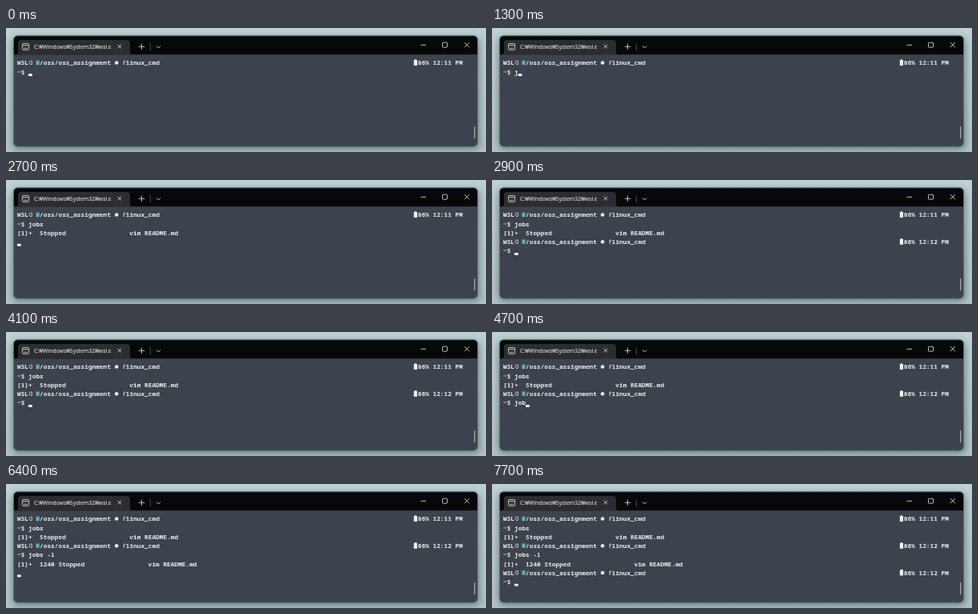
An HTML page that plays this animation: 600x155 px, repeating every 7.9 s.

```html
<!DOCTYPE html>
<html lang="en">
<head>
<meta charset="utf-8">
<title>Terminal: jobs</title>
<style>
html, body { margin: 0; width: 100%; height: 100%; overflow: hidden; background: #b9cacd; }
svg { display: block; width: 100%; height: 100%; }
text { white-space: pre; }
.mono { font: 600 7.8px "Noto Sans Mono", monospace; fill: #e9ecee; }
.title { font: 500 6.9px "Noto Sans", sans-serif; fill: #f4f4f4; }
.line { fill: none; stroke: #e6e6e6; stroke-width: .8; }
</style>
</head>
<body>
<svg viewBox="0 0 600 155" preserveAspectRatio="none">
  <defs>
    <linearGradient id="desk" x2="0" y2="1">
      <stop offset="0" stop-color="#c0d1d4"/>
      <stop offset="1" stop-color="#b3c5c8"/>
    </linearGradient>
    <filter id="soft" x="-10%" y="-20%" width="120%" height="140%"><feGaussianBlur stdDeviation="5"/></filter>
    <clipPath id="win"><rect x="9.5" y="9.8" width="580" height="138.4" rx="5"/></clipPath>
    <clipPath id="label"><rect x="34" y="15" width="97" height="18"/></clipPath>
    <g id="prompt">
      <text class="mono" x="14" y="0">WSL</text>
      <path class="line" d="M32.4 -5.2V-1H30.4L28.8 -3L30.4 -5.2Z"/>
      <rect x="37.4" y="-5.7" width="4.4" height="5.4" fill="#62a9b5"/>
      <text class="mono" x="42.08" y="0">/oss/oss_assignment</text>
      <circle cx="138.2" cy="-2.9" r="2.3" fill="#e9ecee"/>
      <path d="M145.6 -7.4V1" stroke="#15181c" stroke-width=".9"/>
      <path class="line" d="M146.8 .3V-6M146.8 -2.2Q149 -2.6 149 -5.4"/>
      <text class="mono" x="149.72" y="0">linux_cmd</text>
      <path d="M509.8 -6.4H511V-7.2H512.8V-6.4H514V.6H509.8Z" fill="#f1f3f4"/>
    </g>
  </defs>

  <rect width="600" height="155" fill="url(#desk)"/>
  <rect x="8" y="12" width="584" height="140" rx="6" fill="#25383b" opacity=".5" filter="url(#soft)"/>

  <g clip-path="url(#win)">
    <rect x="9" y="9" width="582" height="140" fill="#3d434c"/>
    <rect x="9" y="9" width="582" height="24.2" fill="#07080a"/>
    <path d="M12 33.2Q15 33.2 15 30V19Q15 15 19 15H151Q155 15 155 19V30Q155 33.2 158 33.2Z" fill="#2b2d31"/>
  </g>
  <rect x="9.5" y="9.8" width="580" height="138.4" rx="5" fill="none" stroke="#3c7f7a" stroke-width=".8"/>

  <g class="line">
    <rect x="20.6" y="19.4" width="8" height="8" rx="1.4"/>
    <path d="M20.6 21.6H28.6M22.4 25.4H26.6"/>
    <path d="M139.6 20.7L144.4 25.5M144.4 20.7L139.6 25.5"/>
    <path d="M165.8 23.3H173.2M169.5 19.6V27"/>
    <path d="M180.3 18.5V28.5" stroke="#55585c"/>
    <path d="M188 22.5L190.5 25L193 22.5"/>
    <path d="M518.4 21.3H525"/>
    <rect x="545.5" y="18.2" width="6" height="6" rx=".7"/>
    <path d="M573 18.2L579 24.2M579 18.2L573 24.2"/>
  </g>
  <g clip-path="url(#label)"><text class="title" x="35" y="26">C:₩Windows₩System32₩wsl.exe</text></g>

  <g id="screen"></g>
  <rect id="cursor" width="4.68" height="2.8" fill="#fff"/>
  <rect x="585" y="123" width="1.4" height="15" rx=".7" fill="#a3a7ab"/>
</svg>

<script>
const LOOP = 7900, COL = 4.68, ROW = 11.25, LEFT = 14, BASE = 46.4;
const screen = document.getElementById("screen");
const cursor = document.getElementById("cursor");
const gap = " ".repeat(17);

// keys: time of each keystroke; out: output shown; next: prompt returns
const runs = [
  { clock: "12:11", cmd: "jobs", keys: [1300, 1400, 1500, 1900],
    out: 2700, text: "[1]+  Stopped" + gap + "vim README.md", next: 2800 },
  { clock: "12:12", cmd: "jobs -l", keys: [4500, 4600, 4700, 4800, 5400, 5700, 6000],
    out: 6400, text: "[1]+  1240 Stopped" + gap + "vim README.md", next: 6500 },
  { clock: "12:12", cmd: "", keys: [], out: Infinity }
];

const textAt = (col, row, s) =>
  `<text class="mono" x="${LEFT + col * COL}" y="${BASE + row * ROW}">${s}</text>`;

const promptAt = (row, clock) =>
  `<use href="#prompt" y="${BASE + row * ROW}"/>` + textAt(107, row, `86% ${clock} PM`);

let shown = "";

function draw(t) {
  let html = "", row = 0, col = 0;
  for (const run of runs) {
    const typed = run.cmd.slice(0, run.keys.filter(k => k <= t).length);
    html += promptAt(row, run.clock) + textAt(0, row + 1, "~$ " + typed);
    if (t < run.out) {
      row += 1;
      col = 3 + typed.length;
      break;
    }
    html += textAt(0, row + 2, run.text);
    row += 3;
    col = 0;
    if (t < run.next) break;
  }
  if (html !== shown) screen.innerHTML = shown = html;
  cursor.setAttribute("x", LEFT + col * COL);
  cursor.setAttribute("y", BASE + row * ROW - .4);
}

const start = performance.now();
function tick() {
  draw((performance.now() - start) % LOOP);
  requestAnimationFrame(tick);
}
tick();
</script>
</body>
</html>
```
